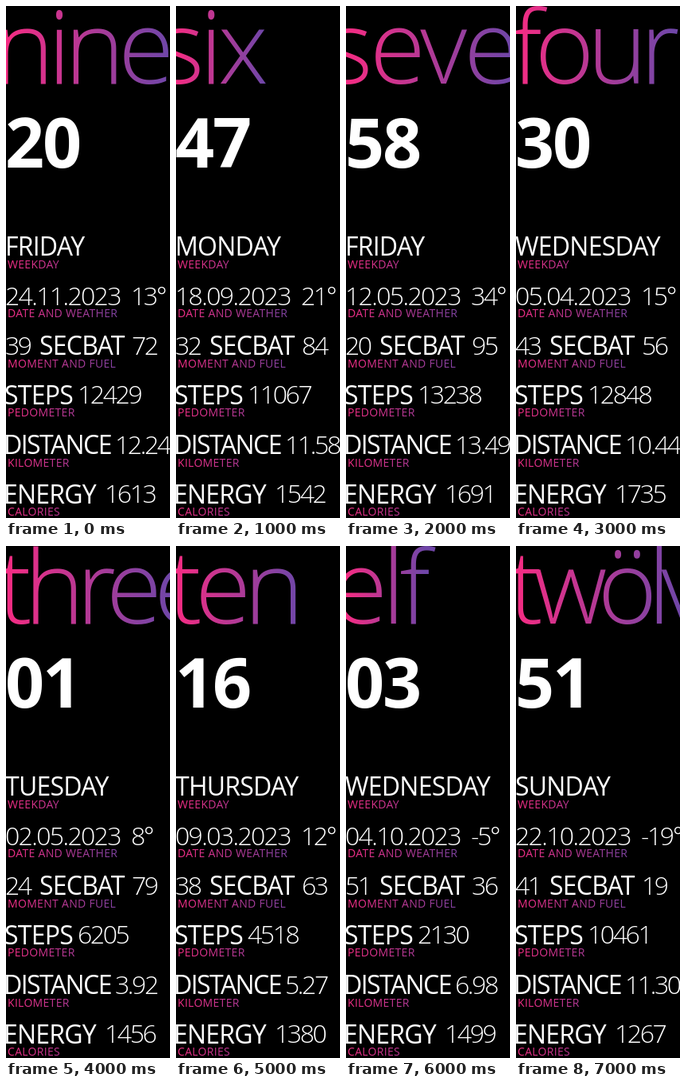
Recreate the animation shown at these times as an HTML page. Size 206 by 640 pixels, loop 8000 ms.

```html
<!DOCTYPE html>
<html lang="en">
<head>
<meta charset="utf-8">
<style>
  html, body { margin: 0; width: 100%; height: 100%; overflow: hidden; background: #000; }
  svg { display: block; width: 206px; height: 640px; }
  text { font: 400 32px "Open Sans", "Noto Sans", sans-serif; fill: #fff; white-space: pre; }
  .hour { font-size: 128px; font-weight: 300; fill: url(#hourTint); }
  .minute { font-size: 86px; font-weight: 700; letter-spacing: -2px; }
  .value { font-weight: 350; letter-spacing: -2.4px; }
  .date { font-weight: 350; letter-spacing: -1.65px; }
  .title { letter-spacing: -.8px; }
  .tight { letter-spacing: -1.6px; }
  .caption { font-size: 14px; letter-spacing: .3px; fill: url(#captionTint); }
</style>
</head>
<body>
<svg id="face" viewBox="0 0 206 640">
  <defs>
    <linearGradient id="hourTint" gradientUnits="userSpaceOnUse" x1="0" x2="206" y1="0" y2="0">
      <stop offset="0" stop-color="#f52c83"/><stop offset="1" stop-color="#7046a8"/>
    </linearGradient>
    <linearGradient id="captionTint" gradientUnits="userSpaceOnUse" x1="0" x2="160" y1="0" y2="0">
      <stop offset="0" stop-color="#f52c83"/><stop offset="1" stop-color="#7046a8"/>
    </linearGradient>
  </defs>
</svg>
<script>
const STEP = 1000;
const face = document.getElementById('face');
const tint = document.getElementById('hourTint');

// hour, its x and tracking, minute, weekday, date, temperature, second, battery, steps, distance, energy
const states = [
  ['nine', -15, -8, '20', 'FRIDAY', '24.11.2023', '13°', '39', '72', '12429', '12.24', '1613'],
  ['six', -24, -6, '47', 'MONDAY', '18.09.2023', '21°', '32', '84', '11067', '11.58', '1542'],
  ['seven', -26, -4, '58', 'FRIDAY', '12.05.2023', '34°', '20', '95', '13238', '13.49', '1691'],
  ['four', -6, -9, '30', 'WEDNESDAY', '05.04.2023', '15°', '43', '56', '12848', '10.44', '1735'],
  ['three', -10, -10, '01', 'TUESDAY', '02.05.2023', '8°', '24', '79', '6205', '3.92', '1456'],
  ['ten', -10, -9, '16', 'THURSDAY', '09.03.2023', '12°', '38', '63', '4518', '5.27', '1380'],
  ['elf', -18, -7, '03', 'WEDNESDAY', '04.10.2023', '-5°', '51', '36', '2130', '6.98', '1499'],
  ['twölve', -9, -12, '51', 'SUNDAY', '22.10.2023', '-19°', '41', '19', '10461', '11.30', '1267']
];

function label(kind, x, y, str = '') {
  const el = document.createElementNS('http://www.w3.org/2000/svg', 'text');
  el.setAttribute('class', kind);
  el.setAttribute('x', x);
  el.setAttribute('y', y);
  el.textContent = str;
  face.append(el);
  return el;
}

const hour = label('hour', 0, 97);
const fields = [
  label('minute', -1, 202),
  label('title', -1, 312),
  label('date', -1, 374),
  label('value', 157, 374),
  label('value', -1, 436),
  label('value', 158, 436),
  label('value', 90, 497),
  label('value', 137, 560),
  label('value', 124, 621)
];

label('title', 42, 436, 'SECBAT');
label('title', -2, 498, 'STEPS');
label('tight', -3, 560, 'DISTANCE');
label('title', -3, 622, 'ENERGY');

label('caption', 2, 328, 'WEEKDAY');
label('caption', 2, 389, 'DATE AND WEATHER');
label('caption', 2, 452, 'MOMENT AND FUEL');
label('caption', 2, 513, 'PEDOMETER');
label('caption', 2, 576, 'KILOMETER');
label('caption', 2, 637, 'CALORIES');

let shown = -1;
function draw(now) {
  const i = Math.floor(now / STEP) % states.length;
  if (i === shown) return;
  shown = i;
  const [word, x, tracking, ...rest] = states[i];
  hour.textContent = word;
  hour.setAttribute('x', x);
  hour.style.letterSpacing = tracking + 'px';
  tint.setAttribute('x2', Math.min(206, x + hour.getComputedTextLength()));
  rest.forEach((str, k) => { fields[k].textContent = str; });
}

const start = performance.now();
function tick() {
  draw(performance.now() - start);
  requestAnimationFrame(tick);
}
tick();
</script>
</body>
</html>
```
